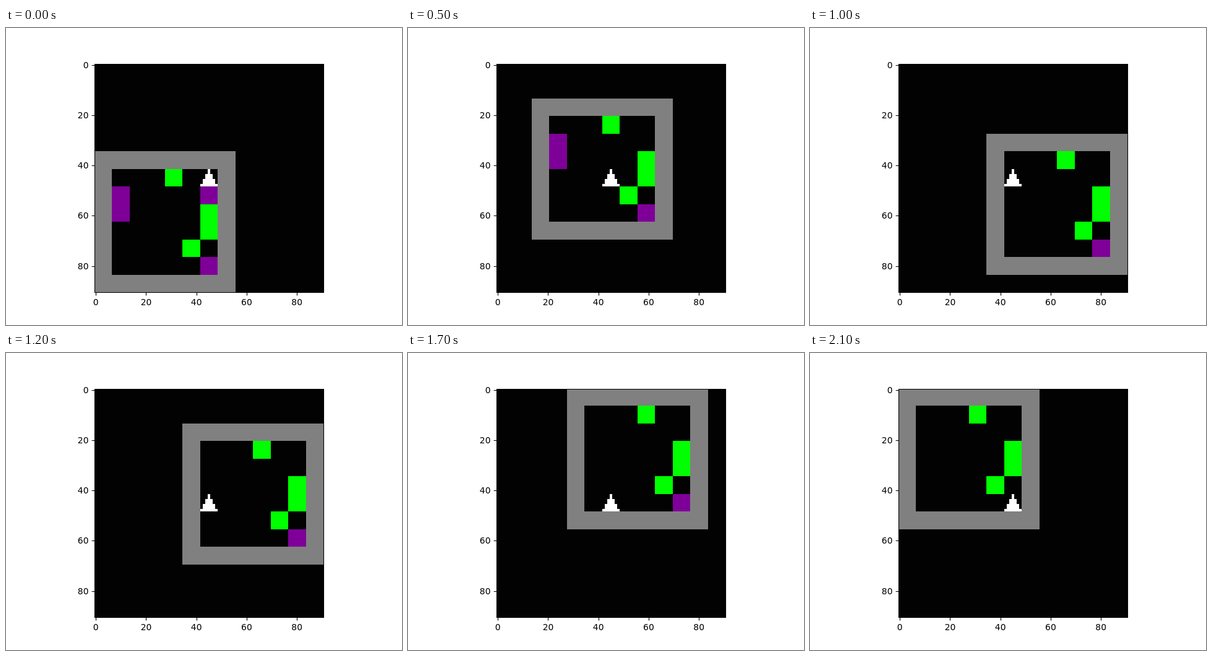
Animation of 640 by 480 pixels, one loop 2.2 s. Source, as an HTML page:

```html
<!DOCTYPE html>
<html lang="en">
<head>
<meta charset="utf-8">
<title>Grid world</title>
<style>
  html, body { margin: 0; width: 100%; height: 100%; overflow: hidden; background: #fff; }
  svg { display: block; width: 640px; height: 480px; }
  text { font: 13.889px "DejaVu Sans", sans-serif; fill: #000; }
</style>
</head>
<body>
<svg viewBox="0 0 640 480">
  <rect width="640" height="480" fill="#fff"/>
  <rect x="143" y="58" width="370" height="369" fill="#020202"/>
  <g id="world" shape-rendering="crispEdges"></g>
  <g id="axes" fill="none" stroke="#000" stroke-width="1.111">
    <path stroke-linecap="square" d="M143.5 58.5H513.5V427.5H143.5Z"/>
  </g>
</svg>
<script>
const NS = "http://www.w3.org/2000/svg";
const STEP = 100, CELL = 7, CENTER = 6, ROOM = 8;
const GRAY = "#808080", GREEN = "#00ff00", PURPLE = "#7f0098", BLACK = "#020202", WHITE = "#fff";
const MOVES = ".DLDLDLLULUDD..DRDRRRR";
const DIRS = { L: [-1, 0], R: [1, 0], U: [0, -1], D: [0, 1], ".": [0, 0] };
const GREENS = [[4, 1], [6, 3], [6, 4], [5, 5]];
const PURPLES = [[1, 2], [1, 3], [6, 2], [6, 6]];

const world = document.getElementById("world");
const axes = document.getElementById("axes");

function add(parent, tag, attrs, text) {
  const el = document.createElementNS(NS, tag);
  for (const k in attrs) el.setAttribute(k, attrs[k]);
  if (text !== undefined) el.textContent = text;
  return parent.appendChild(el);
}

// Nearest-pixel edges of the 91-unit image
const px = u => Math.round(143 + u * 370 / 91);
const py = u => Math.max(58, Math.round(57 + u * 370 / 91));

function place(el, x, y, w, h) {
  const left = px(x), top = py(y);
  el.setAttribute("x", left);
  el.setAttribute("y", top);
  el.setAttribute("width", px(x + w) - left);
  el.setAttribute("height", py(y + h) - top);
}

const block = (fill, x, y, size = 1) => ({ el: add(world, "rect", { fill }), x, y, size });

const path = [];
let ax = 6, ay = 1;
for (const m of MOVES) {
  ax += DIRS[m][0];
  ay += DIRS[m][1];
  path.push([ax, ay]);
}

const blocks = [
  block(GRAY, 0, 0, ROOM),
  block(BLACK, 1, 1, ROOM - 2),
  ...GREENS.map(([x, y]) => block(GREEN, x, y)),
  ...PURPLES.map(([x, y]) => {
    const eaten = path.findIndex(p => p[0] === x && p[1] === y);
    return { ...block(PURPLE, x, y), eaten };
  })
];

// The agent stays at the centre of the view
for (let row = 0; row < CELL; row++) {
  const half = row >> 1;
  const u = CENTER * CELL;
  place(add(world, "rect", { fill: WHITE }), u + 3 - half, u + row, 2 * half + 1, 1);
}

const snap = v => Math.floor(v + 0.5) + 0.5;
for (let n = 0; n <= 80; n += 20) {
  const d = (n + 0.5) * 369.6 / 91;
  const x = 143.2 + d, y = 57.6 + d;
  const label = { stroke: "none", fill: "#000" };
  add(axes, "path", { d: `M${snap(x)} 427.5V432.4M143.5 ${snap(y)}H138.6` });
  add(axes, "text", { ...label, x, y: 448, "text-anchor": "middle" }, n);
  add(axes, "text", { ...label, x: 133.5, y: Math.round(y + 5.06), "text-anchor": "end" }, n);
}

let shown = -1;
function draw(time) {
  const step = Math.floor(time / STEP) % MOVES.length;
  if (step === shown) return;
  shown = step;
  const [x, y] = path[step];
  for (const b of blocks) {
    const size = b.size * CELL;
    place(b.el, (b.x + CENTER - x) * CELL, (b.y + CENTER - y) * CELL, size, size);
    const gone = b.eaten >= 0 && step >= b.eaten;
    b.el.setAttribute("visibility", gone ? "hidden" : "visible");
  }
}

const start = performance.now();
function tick() {
  draw(performance.now() - start);
  requestAnimationFrame(tick);
}
tick();
</script>
</body>
</html>
```
